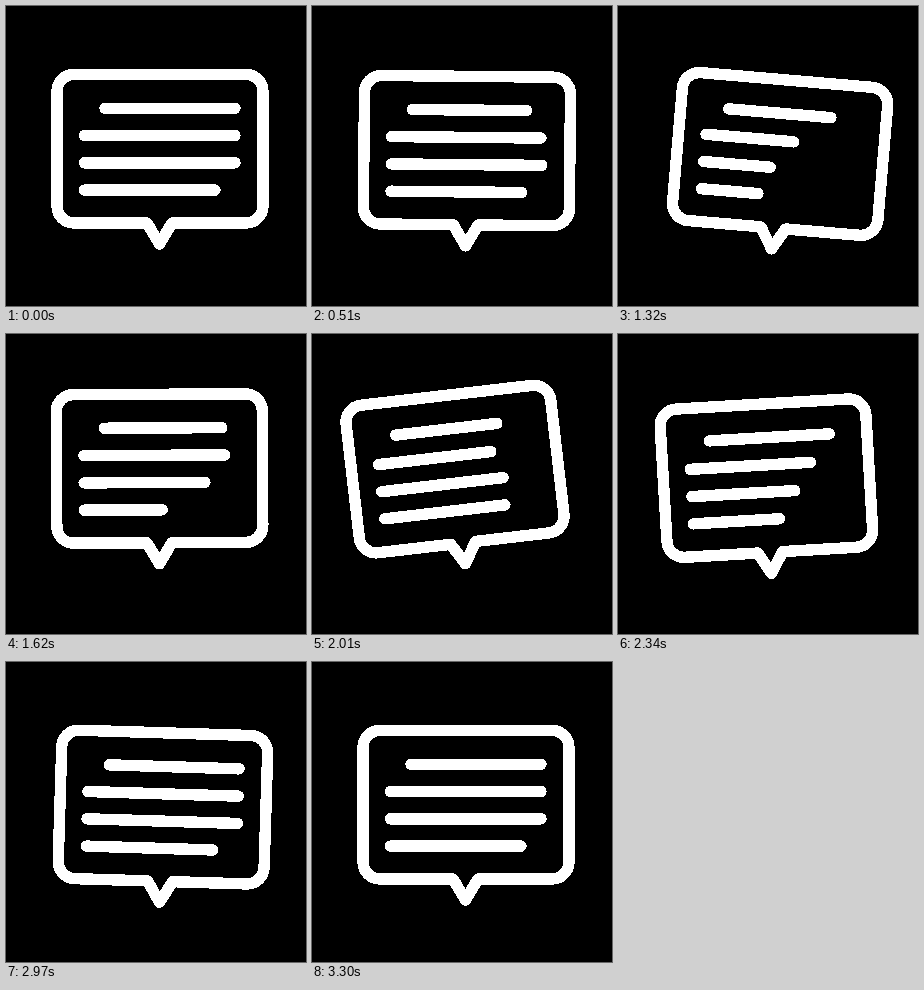
An HTML page that plays this animation: 300 px wide and 300 px high, repeating every 3600 ms.

```html
<!DOCTYPE html>
<html>
<head>
<meta charset="utf-8">
<style>
  html, body { margin: 0; height: 100%; overflow: hidden; background: #000; }
  svg { display: block; width: 100vw; height: 100vh; }
  path {
    fill: none; stroke: #fff; stroke-width: 11.4;
    stroke-linecap: round; stroke-linejoin: round; shape-rendering: crispEdges;
  }
</style>
</head>
<body>
<svg viewBox="0 0 300 300">
  <g id="bubble">
    <path d="M68 68.5H240a17 17 0 0 1 17 17V200a17 17 0 0 1 -17 17H166L153.5 238L141 217H68a17 17 0 0 1 -17 -17V85.5a17 17 0 0 1 17 -17Z"/>
  </g>
</svg>
<script>
const LOOP = 3600, STEP = 30, BEGIN = 330, END = 3300;
const bubble = document.getElementById('bubble');

const lines = Array.from({ length: 4 }, () => {
  const path = document.createElementNS('http://www.w3.org/2000/svg', 'path');
  return bubble.appendChild(path);
});

const ease = p => (1 - Math.cos(Math.PI * p)) / 2;

// Swings from rest through the given [time, value] peaks and back to rest.
function swing(t, ...peaks) {
  const keys = [[0, 0], [BEGIN, 0], ...peaks, [END, 0], [LOOP, 0]];
  const i = keys.findIndex(([time]) => time > t);
  const [t0, a] = keys[i - 1], [t1, b] = keys[i];
  return a + (b - a) * ease((t - t0) / (t1 - t0));
}

// A smooth bump from 0 to 1 and back, centred on the given time.
const bump = (t, centre) => ease(Math.max(0, 1 - Math.abs(t - centre) / 630));

// Each line shrinks twice, a little later than the one above it.
function lineLength(t, i) {
  const first = 0.58 * bump(t, 950 + 145 * i);
  const second = (0.22 + 0.05 * i) * bump(t, 1960 + 165 * i);
  return 1 - first - second;
}

function draw(now) {
  const t = Math.floor(now % LOOP / STEP) * STEP;
  const angle = swing(t, [1195, 5.5], [2080, -6.8], [2720, 2.9]);
  const lift = swing(t, [1035, 12], [1790, -11], [2600, 5]);
  bubble.setAttribute('transform', `translate(0 ${lift}) rotate(${angle} 153.5 238)`);

  lines.forEach((path, i) => {
    const left = i === 0 ? 99 : 78.5;
    const right = i === 3 ? 209 : 229;
    const width = (right - left) * lineLength(t, i);
    path.setAttribute('d', `M${left} ${102.2 + 27.3 * i}h${width}`);
  });
}

const start = performance.now();
function tick() {
  draw(performance.now() - start);
  requestAnimationFrame(tick);
}
tick();
</script>
</body>
</html>
```
